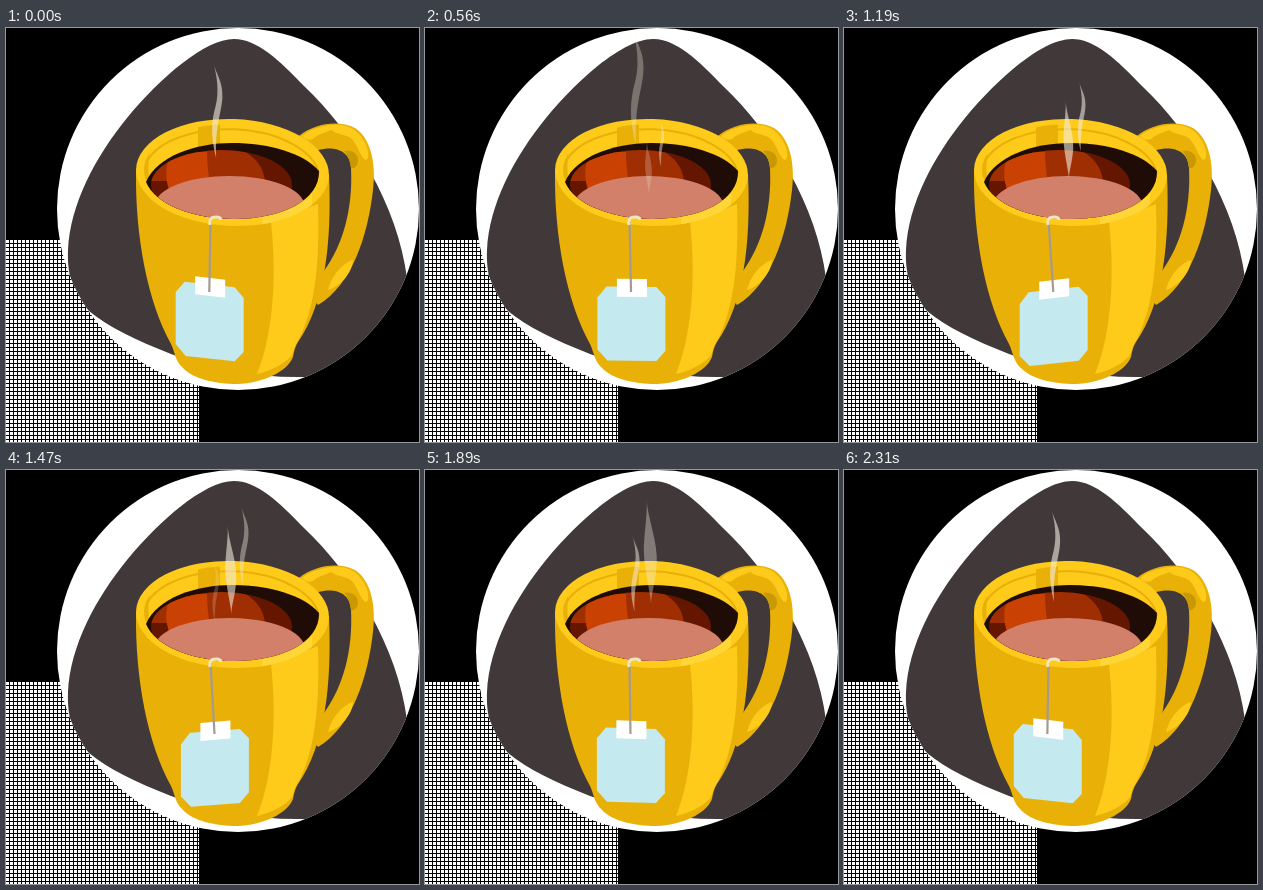
These frames come from a looping animation (413x414 px, 2380 ms). An HTML page:

```html
<!DOCTYPE html>
<html lang="en">
<head>
<meta charset="utf-8">
<title>Cup of tea</title>
<style>
html, body { margin: 0; width: 100%; height: 100%; overflow: hidden; background: #000; }
svg { display: block; width: 100vw; height: 100vh; }
.gold { fill: #e9b008; }
.yellow { fill: #fecb1a; }
</style>
</head>
<body>
<svg viewBox="0 0 413 414" preserveAspectRatio="none">
  <defs>
    <pattern id="dots" width="4" height="4" patternUnits="userSpaceOnUse">
      <rect width="3" height="3" fill="#fff" shape-rendering="crispEdges"/>
    </pattern>
    <clipPath id="disc"><circle cx="232" cy="181" r="181"/></clipPath>
    <clipPath id="tea"><path id="teaEdge" d="M140 154C151 128 190 115 226 115C262 115 298 125 313 143C314 172 276 191 228 191C186 191 149 176 140 154Z"/></clipPath>
    <clipPath id="glow"><ellipse cx="215.500" cy="157" rx="70.500" ry="35"/></clipPath>
    <clipPath id="mouth"><ellipse cx="226" cy="144" rx="88" ry="47.500" transform="rotate(2 226 144)"/></clipPath>
    <clipPath id="rim"><ellipse cx="226.500" cy="144.500" rx="96.500" ry="53.500" transform="rotate(2 226.500 144.500)"/></clipPath>
  </defs>

  <rect y="211" width="193" height="203" fill="url(#dots)"/>
  <circle cx="232" cy="181" r="181" fill="#fff"/>
  <path clip-path="url(#disc)" fill="#403839" d="M228 11C251 11 273 32 298 58C347 104 392 178 401 250L420 349H292C245 349 205 341 165 326C130 312 102 299 83 283C66 267 61 244 62 222C64 176 90 128 121 90C155 49 199 11 228 11Z"/>

  <!-- handle -->
  <path class="gold" fill-rule="evenodd" d="M293 108C309 95 333 92 349 100C366 111 370 138 367 162C362 207 346 257 312 277L300 262L285 125ZM312 122C327 118 344 121 345 140C347 181 337 217 318 243Z"/>
  <path class="yellow" d="M296 108C306 100 322 96 334 97C329 103 316 103 307 111C303 113 299 111 296 108ZM325 98C340 94 354 102 360 117C363 124 363 131 360 132C354 130 351 113 343 109C335 105 324 106 325 98Z"/>
  <path fill="#c99904" d="M338 123C344 121 352 125 352 132C352 138 348 141 345 140C344 132 342 127 338 123Z"/>
  <path class="yellow" d="M347 232C339 234 326 245 322 262C333 259 346 246 347 232Z"/>

  <!-- body -->
  <path class="gold" d="M130 142C129 210 142 274 165 316C169 324 169 333 177 340C187 351 210 356 231 356C257 355 281 344 287 329C288 323 289 319 292 314C319 275 326 215 323 146Z"/>
  <path class="yellow" d="M265 194C271 250 267 307 251 346C269 342 284 332 287 325C288 319 290 316 293 311C309 280 314 235 312 176Z"/>

  <!-- rim and tea -->
  <g clip-path="url(#rim)">
    <path class="yellow" d="M120 80h210v130h-210z"/>
    <path fill="#ffd638" d="M256 160H306V210H256Z"/>
  </g>
  <g clip-path="url(#mouth)">
    <path class="yellow" d="M120 80h210v130h-210z"/>
    <path class="gold" d="M192 90H214V130H192ZM135 160V128L146 117Q140 132 144 160Z"/>
    <path d="M139 138A88 47.500 2 0 1 313 146" fill="none" stroke="#e9b008" stroke-width="2"/>
  </g>
  <use href="#teaEdge" fill="#200c07"/>
  <g clip-path="url(#tea)">
    <g clip-path="url(#glow)">
      <path fill="#651600" d="M140 115h150v90h-150z"/>
      <path fill="#9f2f02" d="M140 115H220C244 123 257 135 259 153H140Z"/>
      <path fill="#c94103" d="M162 134L176 124H201Q201 140 206 170H166Q157 149 162 134Z"/>
    </g>
    <ellipse cx="223.500" cy="178" rx="75" ry="30" fill="#d28069"/>
  </g>

  <!-- tea bag -->
  <path id="bag" fill="#c4e9ef" d="M-25-37H25L34-27V27L25 37H-24L-34 26V-26Z"/>
  <path id="tag" fill="#fff" d="M-15-9H15V9H-15Z"/>
  <line id="cord" x1="204.500" y1="193" y2="264" stroke="#a49a92" stroke-width="2.200"/>
  <path d="M204 197C203 190 206 189 210 189C214 189 215 190 215 192" fill="none" stroke="#f0e5bd" stroke-width="3"/>

  <g id="steam" fill="#f4eee0"></g>
</svg>
<script>
const LOOP = 2380, STEP = 70;
const RISE = 0.062, GROW = 0.038; // px per ms
const el = id => document.getElementById(id);

// Unit-height outlines, tip to tail
const curl = "M0 0C3 .13 9.500 .2 9 .36C8.500 .53 2 .64 3 1C-3 .76 -1 .6 2.500 .46C6 .32 4 .14 0 0Z";
const flame = "M0 0C1 .2 10 .4 9 .62C8 .8 4 .9 4 1C3 .85 -4 .6 -2 .4C-1 .25 1 .1 0 0Z";

const wisps = [
  { shape: curl, x: 207, y: 104, height: 53, birth: 1250, life: 2050 },
  { shape: curl, x: 234.5, y: 121, height: 29, birth: 80, life: 1800 },
  { shape: flame, x: 221.5, y: 127, height: 45, birth: 300, life: 2000 }
];

for (const w of wisps) {
  w.node = document.createElementNS("http://www.w3.org/2000/svg", "path");
  w.node.setAttribute("d", w.shape);
  el("steam").append(w.node);
}

// Each wisp rises and grows steadily while it fades in and out
function drawWisp({ node, x, y, height, birth, life }, t) {
  const age = (t - birth + LOOP) % LOOP;
  const h = height + GROW * age;
  const alpha = age < life ? 0.6 * Math.sin(Math.PI * age / life) : 0;
  node.setAttribute("opacity", alpha);
  node.setAttribute("transform", `translate(${x} ${y - RISE * age}) scale(${h / 92} ${h})`);
}

function hang(id, x, y, tilt) {
  el(id).setAttribute("transform", `translate(${x} ${y}) skewY(${tilt})`);
}

function draw(now) {
  const t = Math.floor(now % LOOP / STEP) * STEP;
  const s = -Math.cos(2 * Math.PI * t / LOOP); // swing, -1 left to 1 right
  const x = 206.7 + 3 * s;
  hang("bag", x, 296 + 2.5 * s, -6 * s);
  hang("tag", x + 0.5, 260 + s, -6.6 * s);
  el("cord").setAttribute("x2", x - 0.4);
  for (const w of wisps) drawWisp(w, t);
}

const start = performance.now();
function tick() {
  draw(performance.now() - start);
  requestAnimationFrame(tick);
}
draw(0);
requestAnimationFrame(tick);
</script>
</body>
</html>
```
